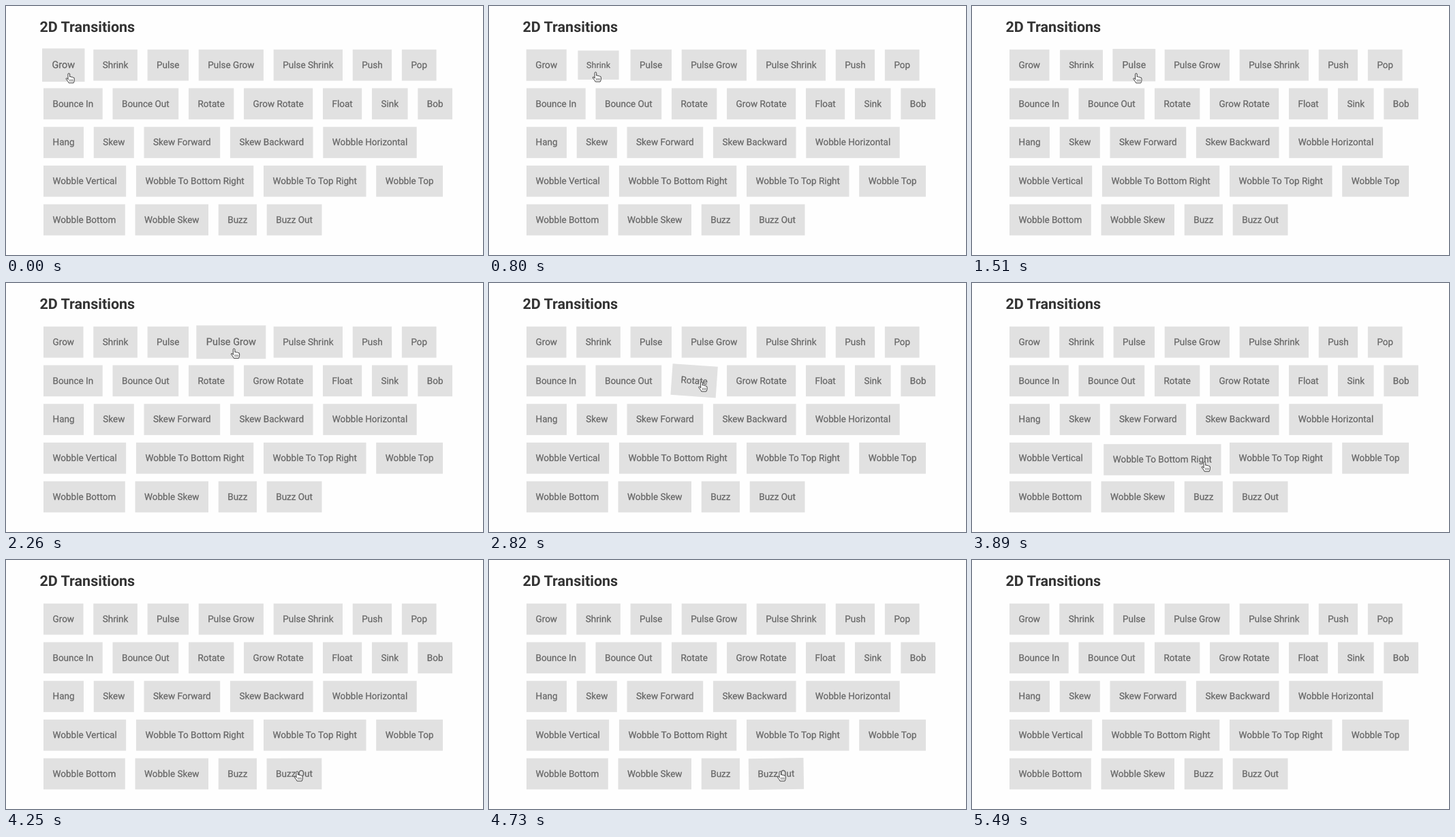
Recreate the animation shown at these times as an HTML page. Size 700 by 365 pixels, loop 6.05 s.

```html
<!DOCTYPE html>
<html lang="en">
<head>
<meta charset="utf-8">
<title>2D Transitions</title>
<style>
html, body { margin: 0; width: 100%; height: 100%; overflow: hidden; background: #fefefe; }
svg { display: block; width: 700px; height: 365px; font-family: Roboto, sans-serif; }
text { text-rendering: geometricPrecision; user-select: none; }
.title { font-size: 21.5px; font-weight: 700; fill: #333; }
.btn rect { fill: #e1e1e1; }
.btn text { font-size: 13.5px; fill: #666; stroke: #666; stroke-width: .25px; text-anchor: middle; }
</style>
</head>
<body>
<svg viewBox="0 0 700 365">
  <text class="title" x="49.4" y="38.3">2D Transitions</text>
  <g id="buttons"></g>
  <g id="hand" stroke="#2a2a2a" stroke-width=".9" stroke-linejoin="round" stroke-linecap="round">
    <path fill="#fff" d="M-1.3 8.6V1.2A1.3 1.3 0 0 1 1.3 1.2V5Q2.6 4.2 3.7 5.4Q5.2 4.8 6 6.1Q8 5.6 8 7.6V10Q8 11.8 6.8 14H-.2Q-1 12-3.6 9Q-4.8 7.4-3.6 6.9Q-2.8 6.6-1.3 8.6Z"/>
    <path fill="none" stroke-width=".7" d="M1.4 9v2.6M3.5 9v2.6M5.6 9v2.6"/>
  </g>
</svg>
<script>
const LOOP = 6050, LEFT = 55, TOP = 63.8, PITCH = 56.7;
const HEIGHT = 45.7, PAD = 13.5, GAP = 14.75;
const NS = 'http://www.w3.org/2000/svg';

const rows = [
  'Grow, Shrink, Pulse, Pulse Grow, Pulse Shrink, Push, Pop',
  'Bounce In, Bounce Out, Rotate, Grow Rotate, Float, Sink, Bob',
  'Hang, Skew, Skew Forward, Skew Backward, Wobble Horizontal',
  'Wobble Vertical, Wobble To Bottom Right, Wobble To Top Right, Wobble Top',
  'Wobble Bottom, Wobble Skew, Buzz, Buzz Out'
];

const clamp = v => Math.min(1, Math.max(0, v));

// CSS cubic-bezier timing
function bezier(x1, y1, x2, y2) {
  const at = (a, b, s) => 3 * a * s * (1 - s) ** 2 + 3 * b * s * s * (1 - s) + s ** 3;
  return x => {
    let lo = 0, hi = 1;
    for (let i = 0; i < 20; i++) {
      const mid = (lo + hi) / 2;
      if (at(x1, x2, mid) < x) lo = mid; else hi = mid;
    }
    return at(y1, y2, lo);
  };
}
const linear = p => p;
const accelerate = p => p * p;
const ease = bezier(.25, .1, .25, 1);
const easeInOut = bezier(.42, 0, .58, 1);

// Pointer moves between rests
const start = { x: 92.3, y: 98.8 };
const moves = [
  { from: 570, to: 830, x: 158, y: 97, curve: easeInOut },
  { from: 1270, to: 1560, x: 246, y: 99, curve: easeInOut },
  { from: 1600, to: 2200, x: 334.6, y: 96.3, curve: easeInOut },
  { from: 2320, to: 2620, x: 312, y: 145, curve: easeInOut },
  { from: 2840, to: 3150, x: 266.5, y: 209, curve: easeInOut },
  { from: 3550, to: 3590, x: 267.3, y: 221, curve: linear },
  { from: 3590, to: 4240, x: 427.3, y: 310, curve: linear },
  { from: 5240, to: 5490, x: 700, y: 372, curve: accelerate }
];

// Transition amount for a hover lasting from a to b
const hover = (t, a, b) => t < b ? ease(clamp((t - a) / 300)) : 1 - ease(clamp((t - b) / 300));
const during = (t, a, b, fn) => t >= a && t < b ? fn(t - a) : '';
const scale = s => `scale(${s})`;

// Swings side to side, reaching size(i) at every i-th step
function swing(steps, size, curve) {
  const i = Math.floor(steps), peak = n => n ? (n % 2 ? 1 : -1) * size(n) : 0;
  return peak(i) + (peak(i + 1) - peak(i)) * curve(steps - i);
}

const effects = {
  'Grow': t => scale(1 + .1 * hover(t, -115, 615)),
  'Shrink': t => scale(1 - .1 * hover(t, 680, 1380)),
  'Pulse': t => during(t, 1410, 1845, d => scale(1.1 - .1 * Math.abs(d - 250) / 250)),
  'Pulse Grow': t => during(t, 1875, 2430, d => scale(1 + .1 * (1 - Math.abs(d / 300 % 2 - 1)))),
  'Rotate': t => `rotate(${4 * hover(t, 2460, 2990)})`,
  'Skew Forward': t =>
    `translate(0 ${HEIGHT / 2}) skewX(${-10 * hover(t, 3030, 3610)}) translate(0 ${-HEIGHT / 2})`,
  'Wobble To Bottom Right': t => during(t, 3650, 3985, d => {
    const m = swing(d / 166.5, i => 10 - 2 * i, easeInOut);
    return `translate(${m} ${m})`;
  }),
  'Buzz Out': t => during(t, 4137, 4887, d => {
    const size = i => 3 - Math.floor((i - 1) / 4);
    const x = swing(d / 75, size, linear), r = swing(d / 75, i => size(i) - 1, linear);
    return `translate(${x} 0) rotate(${r})`;
  })
};

function add(parent, tag, attrs) {
  const el = document.createElementNS(NS, tag);
  for (const k in attrs) el.setAttribute(k, attrs[k]);
  return parent.appendChild(el);
}

const moving = [];
const holder = document.getElementById('buttons');
const hand = document.getElementById('hand');

rows.forEach((row, r) => {
  let x = LEFT;
  for (const label of row.split(', ')) {
    const g = add(holder, 'g', { class: 'btn' });
    const box = add(g, 'rect', {});
    const text = add(g, 'text', { y: 4.4 });
    text.textContent = label;
    const w = text.getComputedTextLength() + 2 * PAD;
    const size = { x: -w / 2, y: -HEIGHT / 2, width: w, height: HEIGHT };
    for (const k in size) box.setAttribute(k, size[k]);
    const place = `translate(${x + w / 2} ${TOP + r * PITCH + HEIGHT / 2})`;
    g.setAttribute('transform', place);
    if (effects[label]) moving.push({ g, place, fx: effects[label] });
    x += w + GAP;
  }
});

function pointer(t) {
  let { x, y } = start;
  for (const m of moves) {
    const k = m.curve(clamp((t - m.from) / (m.to - m.from)));
    x += (m.x - x) * k;
    y += (m.y - y) * k;
  }
  return `translate(${x} ${y})`;
}

function draw(t) {
  for (const m of moving) m.g.setAttribute('transform', `${m.place} ${m.fx(t)}`);
  hand.setAttribute('transform', pointer(t));
  hand.setAttribute('visibility', t < moves.at(-1).to ? 'visible' : 'hidden');
}

function tick() {
  draw(performance.now() % LOOP);
  requestAnimationFrame(tick);
}
tick();
</script>
</body>
</html>
```
